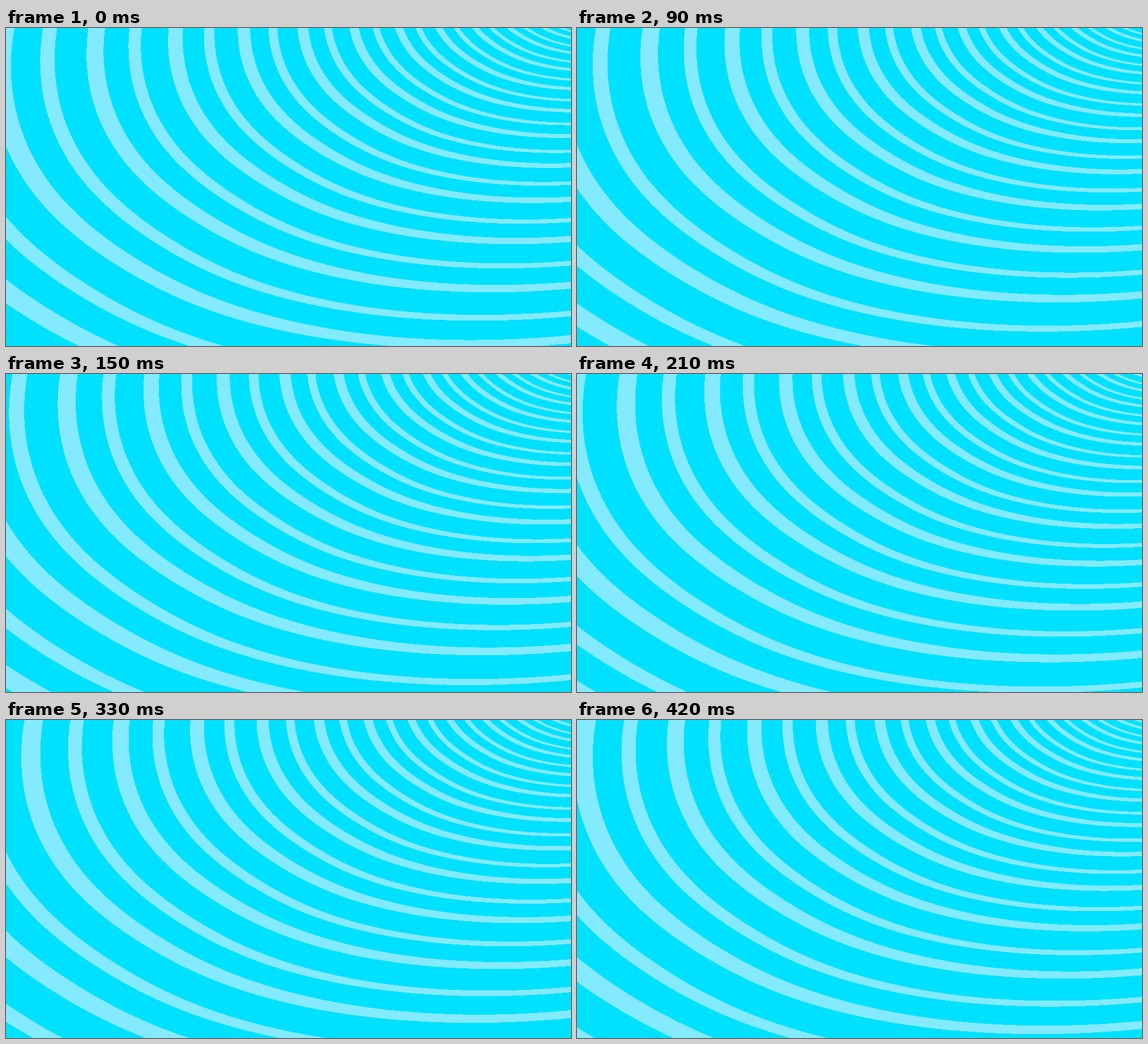
Animation, 998 px wide and 561 px high, one loop 450 ms. Source, as an HTML page:

```html
<!DOCTYPE html>
<html lang="en">
<head>
<meta charset="utf-8">
<title>Spiral</title>
<style>
  html, body { margin: 0; width: 100%; height: 100%; overflow: hidden; background: #00e1ff; }
  svg { display: block; width: 100%; height: 100%; }
</style>
</head>
<body>
<svg viewBox="0 0 998 561" preserveAspectRatio="none">
  <rect width="998" height="561" fill="#00e1ff"/>
  <path id="bands" fill="#84eaff" shape-rendering="crispEdges"/>
</svg>
<script>
const STEP = 30, STEPS = 15;
const TURN = 0.4 / (2 * Math.PI);   // share of a turn per step
const GROWTH = 0.158;               // log growth of the radius per turn
const POLE = { x: 1128, y: -115 };
const FROM = 3, TO = 82;            // visible angles in degrees

const bands = document.getElementById('bands');
const ease = (a, mid, width) => Math.tanh((a - mid) / width);

// Edge positions inside one turn, as a function of the angle.
const wideOuter = () => 0;
const wideInner = a => 0.168 - 0.029 * ease(a, 44, 15);
const thinOuter = a => 0.486 - 0.010 * ease(a, 27, 10);
const thinInner = a => 0.614 - 0.036 * ease(a, 37, 16);

// Log radius of the squashed spiral.
function shape(a) {
  const t = a * Math.PI / 90;
  const q = 2.1269 - 1.0297 * Math.cos(t) - 0.5152 * Math.sin(t)
    + 0.01 * Math.exp(-(((a - 30) / 7) ** 2));
  return 6.9 - Math.log(q) / 2;
}

const rays = [];
for (let a = FROM; a <= TO; a++) {
  const t = a * Math.PI / 180;
  rays.push({ a, cos: Math.cos(t), sin: Math.sin(t), base: shape(a) });
}

function edge(turn, lag) {
  return rays.map(({ a, cos, sin, base }) => {
    const r = Math.exp(base + GROWTH * (turn - lag(a)));
    return (POLE.x - r * cos).toFixed(2) + ' ' + (POLE.y + r * sin).toFixed(2);
  });
}

function band(turn, outer, inner) {
  return 'M' + edge(turn, outer).concat(edge(turn, inner).reverse()).join('L') + 'Z';
}

function draw(ms) {
  const phase = Math.floor(ms / STEP) % STEPS * TURN;
  let d = '';
  for (let ring = -13; ring <= 4; ring++) {
    d += band(ring + phase, wideOuter, wideInner);
    d += band(ring + phase, thinOuter, thinInner);
  }
  bands.setAttribute('d', d);
}

let start;
function tick(now) {
  if (start === undefined) start = now;
  draw(Math.max(0, now - start));
  requestAnimationFrame(tick);
}
draw(0);
requestAnimationFrame(tick);
</script>
</body>
</html>
```
